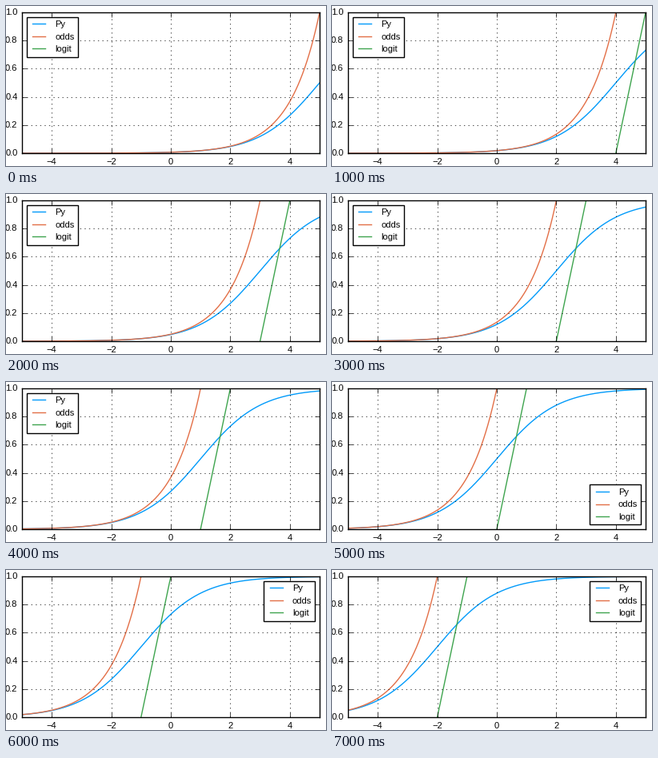
A matplotlib script for the animation above (8000 ms loop, 400x200 px).

```python
import matplotlib.pyplot as plt
import numpy as np
from matplotlib.animation import FuncAnimation

WIDTH, HEIGHT, DPI = 400, 200, 100
LEFT, RIGHT, TOP, BOTTOM = 20, 392, 8, 184
STEPS, STEP_MS = 8, 1000

plt.style.use("classic")
plt.rcParams.update({
    "font.family": "sans-serif",
    "font.sans-serif": ["Liberation Sans"],
    "font.size": 8,
    "legend.fontsize": 8,
    "figure.facecolor": "white",
    "savefig.facecolor": "white",
    "savefig.dpi": DPI,
})

CURVES = {
    "Py": ("#009AFA", lambda z: 1 / (1 + np.exp(-z))),
    "odds": ("#E36F47", np.exp),
    "logit": ("#3EA44E", lambda z: z),
}

fig = plt.figure(figsize=(WIDTH / DPI, HEIGHT / DPI), dpi=DPI)
ax = fig.add_axes([LEFT / WIDTH, 1 - BOTTOM / HEIGHT,
                   (RIGHT - LEFT) / WIDTH, (BOTTOM - TOP) / HEIGHT])
x = np.linspace(-5, 5, 401)
lines = {name: ax.plot(x, x, color=color, lw=1, label=name)[0]
         for name, (color, _) in CURVES.items()}
ax.set(xlim=(-5, 5), ylim=(0, 1),
       xticks=range(-4, 5, 2), yticks=np.linspace(0, 1, 6))
ax.grid(True)
legend = ax.legend(loc="upper left")


def legend_corner(center):
    """Keep the legend in the emptiest corner."""
    if center > 0:
        return "upper left"
    return "lower right" if center == 0 else "upper right"


def update(step):
    center = 5 - step
    for name, (_, curve) in CURVES.items():
        lines[name].set_data(x, curve(x - center))
    legend.set_loc(legend_corner(center))
    return [*lines.values(), legend]


anim = FuncAnimation(fig, update, frames=STEPS, interval=STEP_MS,
                     repeat=True, repeat_delay=0, blit=False)
plt.show()
```
